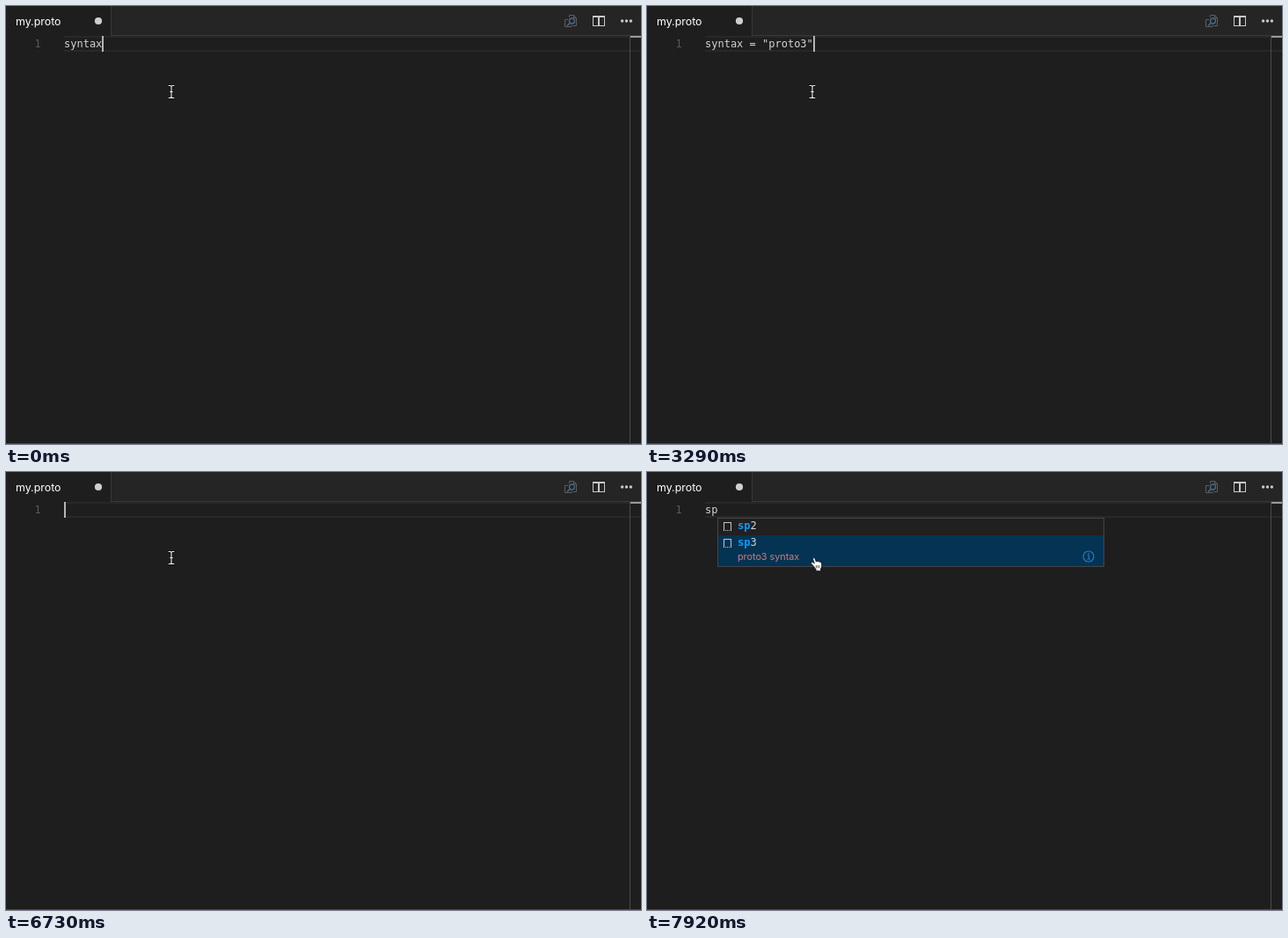
An HTML page for the animation above (8 s loop, 722 by 498 pixels).

```html
<!DOCTYPE html>
<html lang="en">
<head>
<meta charset="utf-8">
<title>Editor typing</title>
<style>
  html, body { margin: 0; width: 100%; height: 100%; overflow: hidden; background: #1e1e1e; }
  svg { display: block; width: 722px; height: 498px; }
  text { white-space: pre; }
  .mono { font: 12px "DejaVu Sans Mono", monospace; fill: #d4d4d4; }
  .ui { font-family: Inter, "Open Sans", sans-serif; }
  .hit { fill: #0f9bf5; font-weight: bold; }
  .crisp { shape-rendering: crispEdges; }
</style>
</head>
<body>
<svg viewBox="0 0 722 498" xmlns="http://www.w3.org/2000/svg">
  <rect width="722" height="498" fill="#1e1e1e"/>

  <!-- tab bar -->
  <g class="crisp">
    <rect x="119" width="603" height="34" fill="#252526"/>
    <rect x="119" width="1" height="34" fill="#383838"/>
    <rect x="119" y="33" width="603" height="1" fill="#383838"/>
  </g>
  <text class="ui" x="11" y="21.5" font-size="12.4" fill="#fff">my.proto</text>
  <circle id="dirty" cx="105" cy="17" r="4.1" fill="#cfcfcf"/>
  <path id="close" d="M101.7 13.7l6.6 6.6M108.3 13.7l-6.6 6.6" stroke="#ececec" stroke-width="2.1"/>

  <!-- toolbar -->
  <g fill="none" stroke="#5a5d60">
    <path d="M640.5 13v-2.5h5l3 3v9h-4M645.5 10.5v3h3M639 15.5h-3.5v8h7.5v-2"/>
    <circle cx="643.5" cy="17" r="3" stroke="#486a87" stroke-width="1.3"/>
    <path d="M641.3 19.2l-3.3 3.3" stroke="#486a87" stroke-width="1.6"/>
  </g>
  <path class="crisp" fill="#c8c8c8" fill-rule="evenodd"
    d="M667 11h14v12h-14zM668 13v9h5v-9zM675 13v9h5v-9z"/>
  <g fill="#c8c8c8">
    <circle cx="700.6" cy="17" r="1.7"/><circle cx="705.5" cy="17" r="1.7"/><circle cx="710.4" cy="17" r="1.7"/>
  </g>

  <!-- editor -->
  <g class="crisp">
    <path d="M66 34h656v2h-656zM66 50h656v2h-656z" fill="#282828"/>
    <rect x="709" y="34" width="1" height="464" fill="#4a4a4a"/>
    <rect x="710" y="34" width="12" height="2" fill="#9a9a98"/>
    <rect y="497" width="722" height="1" fill="#464646"/>
    <rect id="selection" x="66" y="34" width="130" height="18" fill="#264f78"/>
  </g>
  <text class="mono" x="32.6" y="47" style="fill:#5a5a5a">1</text>
  <text id="code" class="mono" x="66" y="47"></text>
  <rect id="caret" class="crisp" y="34" width="2" height="18" fill="#b4b5b3"/>

  <g id="popup"></g>

  <!-- pointers -->
  <g id="beam" fill="none">
    <path id="beamShape" d="M184.7 90.5h1.8q1.5 0 1.5 1.5q0-1.5 1.5-1.5h1.8M188 92v11M184.7 104.5h1.8q1.5 0 1.5-1.5q0 1.5 1.5 1.5h1.8M186.3 97.5h3.4" stroke="#111" stroke-width="2.4"/>
    <use href="#beamShape"/>
    <path d="M184.7 90.5h1.8q1.5 0 1.5 1.5q0-1.5 1.5-1.5h1.8M188 92v11M184.7 104.5h1.8q1.5 0 1.5-1.5q0 1.5 1.5 1.5h1.8M186.3 97.5h3.4" stroke="#f4f4f4" stroke-width="1.1"/>
  </g>
  <g id="hand" stroke-linejoin="round">
    <path d="M189.6 107.2L187 104.4q-1-1.5.3-2q1-.4 2 .6l1 1l-1.5-4.4q-.4-1.7.7-2q1.1-.2 1.7 1.3l1.2 3.3q.3-1.2 1.3-.9q.7.1.9.9q.5-.9 1.4-.5q.6.2.7 1q.8-.6 1.4.2q.6 1.2.6 3.3q0 2.2-1.1 3.8v2.4h-5.5v-1.8q-1.4-1.3-2.5-3.4z"
      fill="#fff" stroke="#111" stroke-width=".8"/>
    <path d="M192.3 106v3.3M194.1 106v3.3M195.9 106v3.3" stroke="#222" stroke-width=".7"/>
  </g>
</svg>
<script>
const LOOP = 8000, CHAR = 7.224;
const $ = id => document.getElementById(id);

// Each step overrides part of the state; it holds until the next one.
const steps = [
  [0, { code: 'syntax', at: 6, caret: true, dirty: true }],
  [300, { caret: false }],
  [450, { code: 'syntax ', at: 7, caret: true }],
  [600, { code: 'syntax =', at: 8 }],
  [750, { code: 'syntax = ', at: 9 }],
  [1200, { code: 'syntax = ""', at: 10 }],
  [1500, { code: 'syntax = "p"', at: 11 }],
  [1640, { code: 'syntax = "pr"', at: 12 }],
  [1790, { code: 'syntax = "pro"', at: 13 }],
  [1940, { code: 'syntax = "prot"', at: 14 }],
  [2090, { code: 'syntax = "proto"', at: 15 }],
  [2540, { caret: false }],
  [3140, { code: 'syntax = "proto3"', at: 16, caret: true }],
  [3290, { at: 17 }],
  [3740, { code: 'syntax = "proto3";', at: 18 }],
  [4340, { caret: false }],
  [4780, { caret: true, dirty: false }],
  [5230, { caret: false }],
  [5530, { caret: true, selected: true }],
  [5980, { caret: false }],
  [6430, { caret: true }],
  [6730, { code: '', at: 0, selected: false, dirty: true }],
  [7180, { code: 's', at: 1, popup: { x: 73, query: 's', focus: 'sp2' } }],
  [7320, { code: 'sp', at: 2 }],
  [7470, { popup: { x: 80, query: 'sp', focus: 'sp2' } }],
  [7920, { caret: false, popup: { x: 80, query: 'sp', focus: 'sp3' } }]
];

const words = ['message', 'sp2', 'sp3', 'sv', 'syntax'];
const details = { sp2: 'proto2 syntax', sp3: 'proto3 syntax' };

const rect = (x, y, w, h, fill) =>
  `<rect class="crisp" x="${x}" y="${y}" width="${w}" height="${h}" fill="${fill}"/>`;
const span = (text, attrs) => `<tspan ${attrs}>${text}</tspan>`;

function highlight(code) {
  if (!code.endsWith(';')) return code;
  return code
    .replace(/"\w+"/, s => span(s, 'fill="#ce9178"'))
    .replace(/^syntax/, s => span(s, 'fill="#569cd6"'));
}

const keywordIcon = (x, y) => `<path class="crisp" fill="#c5c5c5" transform="translate(${x} ${y})"
  d="M0 1h6v1h-6zM8 1h2v1h-2zM0 4h3v1h-3zM5 3h5v1h-5zM5 5h5v1h-5zM0 7h6v1h-6zM8 7h2v1h-2zM0 9h3v1h-3zM5 9h5v1h-5z"/>`;

const snippetIcon = (x, y) => `<path class="crisp" fill="#c5c5c5" transform="translate(${x} ${y})"
  d="M1 0h9v9h-1v-8h-7v8h-1zM1 9h1v1h-1zM3 9h1v1h-1zM5 9h1v1h-1zM7 9h1v1h-1zM9 9h1v1h-1z"/>`;

const infoIcon = (x, y) => `<g transform="translate(${x} ${y})">
  <circle r="6" fill="none" stroke="#2878b8" stroke-width="1.2"/>
  <path d="M-1.5 -1h2v4M-1.7 3h3.6" fill="none" stroke="#2878b8" stroke-width="1.1"/>
  <circle cy="-3.1" r=".9" fill="#2878b8"/></g>`;

function popupMarkup({ x, query, focus }) {
  let y = 53, rows = '';
  for (const word of words.filter(w => w.includes(query))) {
    const focused = word === focus;
    const height = focused ? 35 : 19;
    const icon = word.length > 3 ? keywordIcon : snippetIcon;
    if (focused) {
      rows += rect(x + 1, y, 438, height, '#043353') + infoIcon(x + 422, y + 24) +
        `<text class="ui" x="${x + 23}" y="${y + 27.5}" font-size="10.8" fill="#c97f80">${details[word]}</text>`;
    }
    rows += icon(x + 6, y + 4) +
      `<text class="mono" x="${x + 23}" y="${y + 12}">${word.replace(query, span(query, 'class="hit"'))}</text>`;
    y += height;
  }
  return rect(x, 52, 440, y - 51, '#454545') + rect(x + 1, 53, 438, y - 53, '#202021') + rows;
}

function show(id, on) {
  $(id).style.display = on ? '' : 'none';
}

function draw(state) {
  $('code').innerHTML = highlight(state.code);
  $('caret').setAttribute('x', Math.round(66 + state.at * CHAR));
  $('popup').innerHTML = state.popup ? popupMarkup(state.popup) : '';
  show('caret', state.caret);
  show('selection', state.selected);
  show('dirty', state.dirty);
  show('close', !state.dirty);
  show('beam', !state.popup);
  show('hand', state.popup);
}

let current = -1;
function frame(now) {
  const t = now % LOOP;
  const index = steps.filter(([start]) => start <= t).length - 1;
  if (index !== current) {
    current = index;
    draw(Object.assign({}, ...steps.slice(0, index + 1).map(step => step[1])));
  }
}

const origin = performance.now();
function tick() {
  frame(performance.now() - origin);
  requestAnimationFrame(tick);
}
tick();
</script>
</body>
</html>
```
